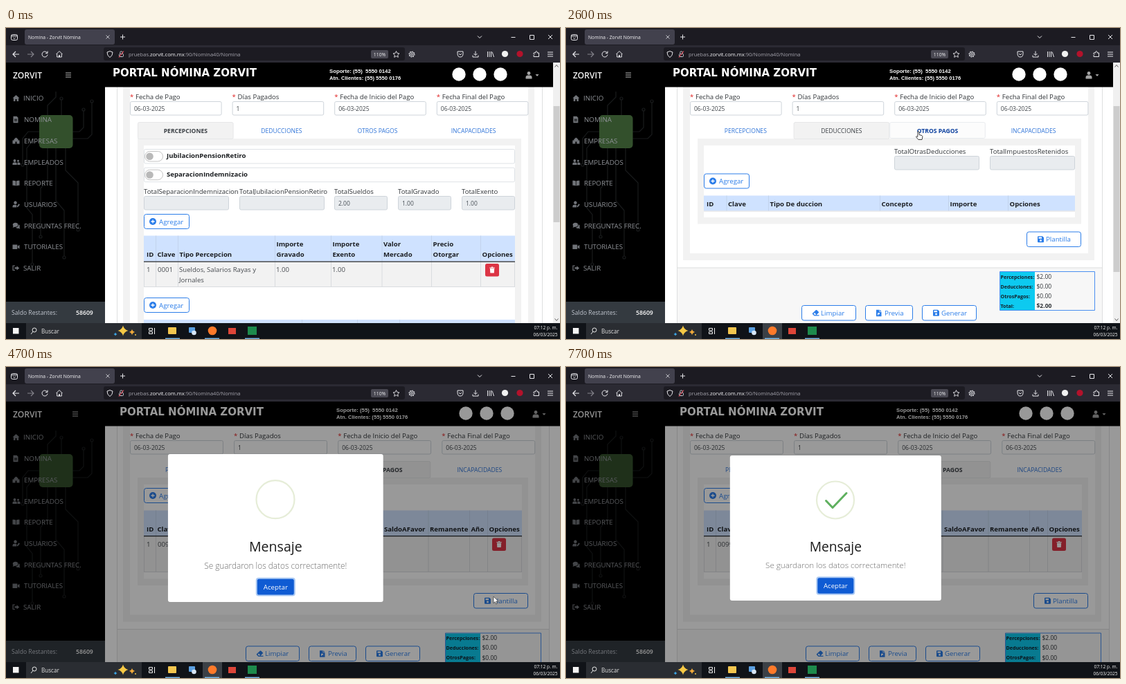
Write an HTML page with a canvas that moves like this. It is 800 px wide and 450 px high and loops after 7800 ms.

```html
<!DOCTYPE html>
<html lang="es">
<head>
<meta charset="utf-8">
<title>Nomina</title>
<style>
html, body { margin: 0; width: 100%; height: 100%; overflow: hidden; background: #fff; }
canvas { display: block; width: 800px; height: 450px; }
</style>
</head>
<body>
<canvas id="stage"></canvas>
<script>
const LOOP = 7800, STEP = 100;
const SANS = '"Open Sans", "Noto Sans", sans-serif';
const WIDE = '"DejaVu Sans", sans-serif';
const ARIAL = '"Liberation Sans", Arial, sans-serif';
const BLUE = '#2b7de9', INK = '#2f3337', BAND = '#f2f2f2', HEAD = '#cfe2ff', LINE = '#d9dcdf';
const BRAND = 'Zorvit';
const TOP = 50, FLOOR = 427;

const cv = document.getElementById('stage');
const g = cv.getContext('2d');
const dpr = window.devicePixelRatio || 1;
cv.width = 800 * dpr;
cv.height = 450 * dpr;

// ---- helpers ----
function rect(x, y, w, h, fill, stroke, r = 0) {
  g.beginPath();
  if (stroke) g.roundRect(x + .5, y + .5, w - 1, h - 1, r);
  else g.roundRect(x, y, w, h, r);
  if (fill) { g.fillStyle = fill; g.fill(); }
  if (stroke) { g.strokeStyle = stroke; g.lineWidth = 1; g.stroke(); }
}
function disc(x, y, r, fill, stroke, lw = 1) {
  g.beginPath();
  g.arc(x, y, r, 0, Math.PI * 2);
  if (fill) { g.fillStyle = fill; g.fill(); }
  if (stroke) { g.strokeStyle = stroke; g.lineWidth = lw; g.stroke(); }
}
function text(s, x, y, size = 9.6, color = INK, weight = 400, align = 'left', font = SANS) {
  g.font = `${weight} ${size}px ${font}`;
  g.textAlign = align;
  g.fillStyle = color;
  g.fillText(s, x, y);
  return g.measureText(s).width;
}
const bold = (s, x, y, size = 9.6, color = '#1b1e21') => text(s, x, y, size, color, 700);
function shape(d, x, y, fill, stroke, lw = 1) {
  const p = new Path2D(d);
  g.save();
  g.translate(x, y);
  if (fill) { g.fillStyle = fill; g.fill(p, 'evenodd'); }
  if (stroke) { g.strokeStyle = stroke; g.lineWidth = lw; g.stroke(p); }
  g.restore();
}
function faded(alpha, paint) {
  g.save();
  g.globalAlpha = alpha;
  paint();
  g.restore();
}
const clamp = v => Math.max(0, Math.min(1, v));
const ramp = (t, a, b) => clamp((t - a) / (b - a));
const ease = p => p * p * (3 - 2 * p);
const mix = (a, b, p) => a + (b - a) * p;
// keys: [position, value] pairs
function track(keys, t, f = p => p) {
  if (t <= keys[0][0]) return keys[0][1];
  for (let i = 1; i < keys.length; i++) {
    const [a, u] = keys[i - 1], [b, v] = keys[i];
    if (t <= b) return mix(u, v, f((t - a) / (b - a)));
  }
  return keys[keys.length - 1][1];
}

const ICON = {
  save: 'M0 1Q0 0 1 0H7L9 2V8Q9 9 8 9H1Q0 9 0 8ZM1.5 1.3V3.4H6V1.3ZM4.5 4.8A1.4 1.4 0 1 0 4.51 4.8Z',
  erase: 'M0 5L5 0.3Q5.7 0 6.3 .5L8.8 3Q9.3 3.6 8.8 4.2L5.5 7.6H9.5V8.8H2.5L0 6.3Q-.4 5.6 0 5ZM1.5 5.7L3.3 7.6H4L5 6.5L3 4.3Z',
  file: 'M0 0H4.5V3H7.5V9.5H0ZM5.2 0L7.5 2.3H5.2ZM2 4.5V7.8H3V6.6H5V4.5Z',
  trash: 'M0 1H2.2L2.8 .2H4.7L5.3 1H7.5V2H0ZM.6 2.7H6.9L6.5 9H1Z'
};
const MENU = [
  ['INICIO', 'M5 0L10 4.6H8.6V9H6V6H4V9H1.4V4.6H0Z'],
  ['NOMINA', 'M1 0H6L8 2V9.5H1ZM2.5 4V5H6.5V4ZM2.5 6V7H6.5V6Z'],
  ['EMPRESAS', 'M5 0L8 2.5V4H10V9H6V6H4V9H0V4H2V2.5Z'],
  ['EMPLEADOS', 'M3 1A1.9 1.9 0 1 0 3.01 1ZM8 1.6A1.5 1.5 0 1 0 8.01 1.6ZM0 9V7Q0 5.3 2 5.3H4.5Q6.2 5.3 6.2 7V9ZM7 9V5.4H9Q11 5.4 11 7V9Z'],
  ['REPORTE', 'M0 1Q3 .5 4.7 1.8V8.6Q3 7.5 0 8ZM5.4 1.8Q7 .5 10 1V8Q7 7.5 5.4 8.6Z'],
  ['USUARIOS', 'M4 0A2.3 2.3 0 1 0 4.01 0ZM0 9V7.5Q0 5.3 2.5 5.3H5L6 6.5L5.5 9ZM9 3.8L10.5 5.2L7.7 8.4L6.3 9L6.6 7Z'],
  ['PREGUNTAS FREC.', 'M4 .5A3.8 3 0 0 1 4 6.5L.2 7.6L1 5.4A3.5 3 0 0 1 4 .5ZM8.6 3Q11 4.2 10 7L10.8 9.2L8 8.6Q5.5 9 4.6 7.4Q8.5 7 8.6 3Z'],
  ['TUTORIALES', 'M0 1.5H6.8V8H0ZM7.4 3.6L10 2V7.5L7.4 6Z'],
  ['SALIR', 'M0 1H3.5V2H1.2V7.5H3.5V8.5H0ZM3 3.7H6V1.6L9.7 4.8L6 8V5.9H3Z']
];

// ---- browser window and taskbar ----
function drawBrowser() {
  rect(0, 0, 800, 26, '#1c1b22');
  rect(27, 2, 130, 22, '#42414d', null, 3);
  rect(0, 25, 800, 25, '#2b2a33');
  const w = '#e8e8ec';
  rect(7, 9, 10, 9, null, w, 2);
  shape('M0 0H8', 8, 11.5, null, w);
  shape('M0 0L2 2L4 0', 10, 13.5, null, w);
  text(`Nomina - ${BRAND} Nómina`, 32, 15.6, 6.75, '#f4f4f6');
  shape('M0 0L5 5M5 0L0 5', 144.5, 10.5, null, '#d0d0d5', .9);
  shape('M0 3.5H7M3.5 0V7', 165, 9.5, null, w);
  shape('M0 0L3 3L6 0', 681, 11.5, null, w);
  shape('M0 0H6', 729.5, 13.5, null, w);
  rect(756, 10, 7, 7, null, w);
  shape('M0 0L6 6M6 0L0 6', 783, 10, null, w);

  shape('M9 4H0M4 0L0 4L4 8', 10, 34, null, w, 1.2);
  shape('M0 4H9M5 0L9 4L5 8', 31, 34, null, '#85848c', 1.1);
  shape('M7.5 2.5A4 4 0 1 0 8 5M8 0V3H5', 52, 33.5, null, w);
  shape('M0 4.5L4.5 0L9 4.5M1.2 3.8V8.5H7.8V3.8M4 8.5V6H5V8.5', 72.5, 33.5, null, w);
  rect(141, 28, 435, 19, '#1c1b22', null, 3);
  shape('M4 0L8 1.5Q8 7 4 9Q0 7 0 1.5Z', 146, 33.5, null, w);
  rect(163, 37, 7, 5, null, '#c7c7cc', 1);
  shape('M0 3V1.5Q0 0 1.7 0Q3.4 0 3.4 1.5V3', 164.8, 33.8, null, '#c7c7cc');
  shape('M0 9L7 0', 163, 33.5, null, '#e04a59', 1.2);
  let x = 177;
  const dim = '#a5a4ad';
  x += text('pruebas.', x, 41, 7.55, dim);
  x += text(BRAND.toLowerCase() + '.com.mx', x, 41, 7.55, '#fbfbfe');
  text(':90/Nomina40/Nomina', x, 41, 7.55, dim);
  rect(527, 32, 25, 12, '#4a4953', null, 2);
  text('110%', 539.5, 40.6, 6.8, '#f4f4f6', 400, 'center');
  shape('M4.5 0L5.9 3L9 3.4L6.7 5.5L7.3 8.8L4.5 7.2L1.7 8.8L2.3 5.5L0 3.4L3.1 3Z', 559, 33.5, null, w, .9);
  disc(586, 38, 1.4, null, w, .9);
  disc(586, 38, 3.3, null, w, .9);
  g.setLineDash([1.3, 1.84]);
  disc(586, 38, 4, null, w, 1.2);
  g.setLineDash([]);
  shape('M0 0H8V3Q8 8 4 8Q0 8 0 3ZM2 3L4 5L6 3', 652, 34, null, w);
  shape('M4 0V6M1.5 3.5L4 6L6.5 3.5M0 6V8.5H8V6', 674, 33.5, null, w);
  shape('M0 0V8M2.5 0V8M5 0V8M6.5 .5L9 8', 695.5, 34, null, w);
  disc(720.5, 37.5, 4.6, '#f2f2f2');
  disc(742, 37.5, 4.6, '#b3122b');
  shape('M0 2.5H2.5V1Q4 -1 5 1V2.5H7.5V8H0V6Q2 5 0 4Z', 762, 33.5, null, w);
  shape('M0 0H8M0 3H8M0 6H8', 782, 35, null, w);
}

function star(x, y, r, fill) {
  shape(`M0 ${-r}Q${r * .2} ${-r * .2} ${r} 0Q${r * .2} ${r * .2} 0 ${r}Q${-r * .2} ${r * .2} ${-r} 0Q${-r * .2} ${-r * .2} 0 ${-r}Z`, x, y, fill);
}

function drawTaskbar(focused) {
  rect(0, FLOOR, 800, 450 - FLOOR, '#101318');
  rect(10, 434, 8.5, 8.5, '#f4f4f4');
  rect(29, FLOOR, 167, 23, '#2a2d32');
  disc(41, 437, 3, null, '#e6e6e6');
  shape('M0 4L3.2 0', 36, 439, null, '#e6e6e6');
  text('Buscar', 51, 441.6, 8.1, '#e4e4e4');
  star(169, 438, 7.5, '#f6c945');
  star(182, 440, 4.2, '#f0a93a');
  star(158, 443, 2.6, '#3fa9e8');
  disc(187, 444, 1, '#f6c945');
  rect(206, 434, 6, 4, null, '#eee');
  rect(206, 439, 6, 4, null, '#eee');
  shape('M0 0V9', 214.5, 434, null, '#eee');
  if (focused) rect(284, FLOOR, 28, 23, '#3b4046');
  rect(234, 433, 12, 10, '#f3c64f', null, 1);
  rect(264, 433, 9, 8, '#5b9fe0', null, 1);
  disc(271.5, 441, 3.3, '#d7e6f5');
  disc(298, 438, 6.3, '#ff7a2a');
  rect(321, 434, 11, 9, '#dd4538');
  rect(349, 432, 13, 12, '#1d8a4c');
  for (const x of [230, 287, 345]) rect(x, 448.6, 21, 1.4, '#76b9ed');
  text('07:12 p. m.', 796.5, 435.6, 6.6, '#f4f4f4', 400, 'right');
  text('06/03/2025', 796.5, 446, 6.6, '#f4f4f4', 400, 'right');
}

// ---- page chrome ----
function drawSidebar(s) {
  rect(0, TOP, 143, FLOOR - TOP, '#000');
  const wire = '#191b1c';
  const wires = ['M96 150H106L112 144V120', 'M96 160H118L124 154V108', 'M60 126V112L72 100V92', 'M80 126V104',
    'M60 174V220L50 232V300', 'M72 174V250L84 264V330', 'M86 174V206L104 224V290', 'M48 150H32L24 160V196', 'M48 164H38L30 174V260L38 270V340'];
  for (const d of wires) shape(d, 0, 0, null, wire, 1.2);
  for (const [x, y] of [[112, 118], [124, 106], [80, 102], [50, 302], [84, 332], [104, 292], [24, 198], [38, 342]]) disc(x, y, 2, null, wire, 1.2);
  rect(48, 126, 48.5, 48, '#33502c', null, 5);

  text(BRAND.toUpperCase(), 10, 73, 12.1, '#f2f2f2', 600);
  shape('M0 0H8M0 3H8M0 6H8', 86 + 10 * s, 65, null, '#b9b9b9', 1.1);
  MENU.forEach(([name, d], i) => {
    const y = 101.8 + i * 30.7;
    shape(d, 9.5, y - 4.8, '#707378');
    text(name, i % 8 ? 26 : 25, y + 3.6, 9.75, '#8f9297');
  });
  rect(0, 396, 143, FLOOR - 396, '#343a40');
  text('Saldo Restantes:', 8, 415, 8.6, '#c2c7d0');
  text('58609', 101, 415, 8.7, '#fff', 600);
}

function drawHeader(s) {
  rect(143, TOP, 647 + 10 * s, 35.5, '#000');
  g.save();
  g.translate(10 * s, 0);
  text('PORTAL NÓMINA ' + BRAND.toUpperCase(), 154, 70.3, 15, '#fff', 700, 'left', WIDE);
  text('Soporte: (55)  5550 0142', 467, 64.8, 7.75, '#fff', 700, 'left', ARIAL);
  text('Atn. Clientes: (55) 5550 0176', 467, 75.2, 7.65, '#fff', 700, 'left', ARIAL);
  for (const x of [654, 684, 714]) disc(x, 67, 9.7, '#fff');
  disc(755, 65.5, 2.4, '#a4a4a4');
  shape('M0 5V3Q0 0 3 0H6Q9 0 9 3V5Z', 750.5, 68.6, '#a4a4a4');
  shape('M0 0H5L2.5 3Z', 764.5, 67, '#a4a4a4');
  g.restore();
}

function drawScrollbar(end) {
  rect(790, TOP, 10, FLOOR - TOP, '#f0f0f0');
  rect(790.5, 113, 9, end - 113, '#cdcdcd');
  shape('M0 3L2.5 0L5 3', 792.5, 53.5, null, '#606060');
  shape('M0 0L2.5 3L5 0', 792.5, 420.5, null, '#606060');
}

// ---- page parts ----
function button(label, x, y, w, h, icon, hot) {
  rect(x, y, w, h, hot ? '#0d6efd' : '#fff', BLUE, 3);
  const c = hot ? '#fff' : BLUE;
  if (icon === 'plus') {
    disc(x + 13, y + h / 2, 5, c);
    shape('M0 2.6H5.2M2.6 0V5.2', x + 10.4, y + h / 2 - 2.6, null, '#fff', 1.3);
    text(label, x + 22, y + h / 2 + 3.5, 9.7, c);
  } else {
    shape(ICON[icon], x + 16, y + h / 2 - 4.5, c);
    text(label, x + 28, y + h / 2 + 3.6, 9.7, c);
  }
}
const addButton = y => button('Agregar', 199, y, 66, 22, 'plus');
function readOnly(label, value, x, y, w) {
  text(label, x, y - 3);
  rect(x, y, w, 20.5, '#e9ecef', '#ced4da', 2);
  text(value, x + 6, y + 14, 8.5, '#495057');
}
function trash(x, y) {
  rect(x, y, 20, 18.5, '#dc3545', null, 2.5);
  shape(ICON.trash, x + 6.3, y + 4.4, '#fff');
}
// cols: [left edge, heading, break the heading into lines]
function tableHead(cols, y, h, right) {
  rect(199, y, right - 199, h, HEAD);
  cols.forEach(([x, name, twoLines]) => {
    if (x > 199) rect(x, y, 1, h, '#c2d3ec');
    const lines = twoLines ? name.split(' ') : [name];
    const tx = x + (x > 199 ? 2.5 : 4);
    lines.forEach((s, i) => bold(s, tx, y + h - 6.5 - 15 * (lines.length - 1 - i)));
  });
}
function tableRow(cols, y, h, right) {
  rect(199, y, right - 199, h, BAND);
  for (const [x] of cols) rect(x, y, 1, h, LINE);
  rect(right - 1, y, 1, h, LINE);
  rect(199, y + h, right - 199, 1, LINE);
  rect(199, y - 1, right - 199, 1.2, '#212529');
}
const cell = (s, x, y) => text(s, x, y, 9.6, '#474b50');

function drawPerceptions() {
  ['JubilacionPensionRetiro', 'SeparacionIndemnizacio'].forEach((name, i) => {
    const y = 175 + i * 26.7;
    rect(199, y, 536, 21.5, '#fff', '#dee2e6', 2);
    rect(200, y + 3, 27, 15.5, '#fff', '#c3c3c3', 8);
    disc(207.5, y + 10.8, 5.3, '#b9b9b9');
    bold(name, 232, y + 12.9);
  });
  readOnly('TotalSeparacionIndemnizacion', '', 199, 243, 123);
  readOnly('TotalJubilacionPensionRetiro', '', 337, 243, 123);
  readOnly('TotalSueldos', '2.00', 474, 243, 77);
  readOnly('TotalGravado', '1.00', 566, 243, 77);
  readOnly('TotalExento', '1.00', 658, 243, 77);
  addButton(269);
  const cols = [[199, 'ID'], [216, 'Clave'], [248, 'Tipo Percepcion'], [388, 'Importe Gravado', 1], [469, 'Importe Exento', 1],
    [542.5, 'Valor Mercado', 1], [614, 'Precio Otorgar', 1], [685, 'Opciones']];
  tableHead(cols, 300.5, 37, 735);
  tableRow(cols, 338.5, 35.5, 735);
  cell('1', 203, 353);
  cell('0001', 219, 353);
  cell('Sueldos, Salarios Rayas y', 250, 353);
  cell('Jornales', 250, 368);
  cell('1.00', 390, 353);
  cell('1.00', 471, 353);
  trash(692, 341);
  addButton(390);
  tableHead([[199, ''], [427, ''], [507, ''], [568, '']], 422, 20, 735);
}
function drawDeductions() {
  readOnly('TotalOtrasDeducciones', '', 474, 185, 123);
  readOnly('TotalImpuestosRetenidos', '', 612, 185, 123);
  addButton(210.5);
  tableHead([[199, 'ID'], [231.5, 'Clave'], [292, 'Tipo De duccion'], [453, 'Concepto'], [552, 'Importe'], [638, 'Opciones']], 242.5, 22, 735);
  rect(199, 264.5, 536, 1, LINE);
}
function drawOther(s) {
  const k = 10 * s, right = 735 + k;
  addButton(175);
  const cols = [[199, 'ID'], [216, 'Clave'], [248, 'Tipo'], [379, 'Concepto'], [431, 'Importe'], [475, 'Subsidio Causado', 1],
    [533.5 + k, 'SaldoAFavor'], [599.5 + k, 'Remanente'], [659 + k, 'Año'], [685 + k, 'Opciones']];
  tableHead(cols, 207.5, 36.5, right);
  tableRow(cols, 245, 51, right);
  cell('1', 203, 259.5);
  cell('0099', 219, 259.5);
  ['Subsidio para el empleo', '(efectivamente entregado', 'al trabajador)'].forEach((l, i) => cell(l, 250, 259.5 + 15.2 * i));
  cell('subsidio', 381, 259.5);
  cell('0.00', 433, 259.5);
  cell('0.00', 477, 259.5);
  trash(692 + k, 247.5);
}
const PANES = [drawPerceptions, drawDeductions, drawOther];
const BOTTOM = [600, 274, 306.5];
const THUMB = [281, 353, 338];

function drawTabs(st, s) {
  const w = 138.6 + 2.5 * s;
  ['PERCEPCIONES', 'DEDUCCIONES', 'OTROS PAGOS', 'INCAPACIDADES'].forEach((name, i) => {
    const x = 190 + i * w, on = i === st.tab;
    if (on) rect(x, 136, w, 25, BAND, '#e6e7e8', 2);
    else if (i === st.hover) rect(x, 136, w, 24, '#fcfcfc', '#e9ecef', 2);
    let c = on ? '#3a3f44' : '#2f74d8';
    if (i === st.hover) c = on ? '#16305c' : '#0a3f9e';
    text(name, x + w / 2, 152, 8.6, c, i === st.focus ? 700 : 400, 'center');
  });
}

function drawPage(st) {
  const s = st.wide, k = 10 * s, h = BOTTOM[st.pane];
  rect(143, TOP, 657, FLOOR - TOP, '#fff');
  rect(160, 85, 1, FLOOR - 85, '#dedfe0');
  rect(774 + k, 85, 1, FLOOR - 85, '#dedfe0');
  rect(169, 85, 594 + k, h + 62 - 85, BAND);
  rect(179, 85, 575 + k, h + 52 - 85, '#fff');
  ['Fecha de Pago', 'Días Pagados', 'Fecha de Inicio del Pago', 'Fecha Final del Pago'].forEach((name, i) => {
    const x = 179 + i * (147.6 + 2.5 * s);
    text('*', x, 102.5, 9.6, '#e02020');
    text(name, x + 8, 102.5);
    rect(x, 106, 132.6 + 2.3 * s, 20.5, '#fff', '#ced4da', 2);
    text(i === 1 ? '1' : '06-03-2025', x + 6, 119.6, 8.5, '#3d4247');
  });
  // the panel fades together with its contents
  faded(st.alpha, () => {
    rect(190, 160, 554 + k, h + 9.5 - 160, BAND);
    rect(199, 170, 536 + k, h - 170, '#fff');
    PANES[st.pane](s);
  });
  drawTabs(st, s);

  button('Plantilla', 665 + k, h + 20.5, 79, 22.5, 'save', st.hot);
  const f = h + 72.5;
  rect(161, f, 613 + k, 100, '#f7f7f7');
  rect(160, f, 615 + k, 1, '#dedfe0');
  const x = 626 + 8 * s, y = f + 5.5;
  rect(x, y, 138 + s, 57, '#f7f7f7', '#4a8ff0');
  rect(x + 1, y + 1, 50, 55, '#0dcaf0');
  ['Percepciones:', 'Deducciones:', 'OtrosPagos:', 'Total:'].forEach((name, i) => {
    const by = y + 10.5 + i * 14.1;
    bold(name, x + 1.5, by, 7.1, '#14202b');
    text(i % 3 ? '$0.00' : '$2.00', x + 53.5, by + .3, 8.5, INK, i === 3 ? 700 : 400);
  });
  const b = f + 54.5 - 30 * s;
  button('Limpiar', 340 + 6 * s, b, 79 - s, 22.5, 'erase');
  button('Previa', 432 + 5 * s, b, 69, 22.5, 'file');
  button('Generar', 514 + 5 * s, b, 79, 22.5, 'save');
}

// ---- message box ----
function drawDialog(age) {
  const scale = track([[0, .7], [135, 1.05], [240, .95], [300, 1]], age, ease);
  g.save();
  g.translate(389.3, 233);
  g.scale(scale, scale);
  g.translate(-389.3, -233);
  rect(236.8, 128, 305, 210, '#fff', null, 3);
  disc(389, 192.5, 27, null, '#e6edd8', 2.2);
  const tip = ramp(age, 405, 560), arm = ramp(age, 500, 650);
  g.lineCap = g.lineJoin = 'round';
  if (tip > 0) {
    const d = `M375.5 193.5L${mix(375.5, 385, tip)} ${mix(193.5, 203.5, tip)}` + (arm > 0 ? `L${mix(385, 405, arm)} ${mix(203.5, 182.5, arm)}` : '');
    shape(d, 0, 0, null, '#5fb05f', 3);
  }
  g.lineCap = 'butt';
  g.lineJoin = 'miter';
  text('Mensaje', 389.3, 266.5, 19.2, '#1c1c1c', 400, 'center');
  text('Se guardaron los datos correctamente!', 389.3, 290.5, 11.6, '#6c6c6c', 300, 'center');
  rect(361.3, 303.3, 56, 26.4, '#a9c8f3', null, 4);
  rect(363.3, 305.3, 52, 22.4, '#0f5bd3', null, 2.5);
  text('Aceptar', 389.3, 320, 9.6, '#fff', 400, 'center');
  g.restore();
}

// ---- pointer: [time, x, y] ----
const PATH = [
  [500, 430, 462], [1400, 380, 151], [2000, 380, 151], [2500, 509, 150], [3000, 509, 150],
  [3600, 677, 251], [4000, 704, 333], [4800, 704, 332], [5400, 699, 334], [5700, 699, 334], [6100, 645, 464]
];
function drawPointer(t, hand) {
  if (t < 500 || t > 6100) return;
  const at = n => track(PATH.map(p => [p[0], p[n]]), t, ease);
  const x = at(1), y = at(2);
  if (hand) shape('M0 0Q1.4 -.8 2 .4V4.5L6 5.6Q7 6 6.8 8L6 11.5H.8L-2.6 7.4Q-2 6 -.2 7.4Z', x - 1, y, '#fff', '#111', .8);
  else shape('M0 0V9.6L2.2 7.6L3.7 11L5.2 10.3L3.8 7H6.8Z', x, y, '#fff', '#333', .7);
}

// ---- timeline ----
const CLICK_1 = 1675, CLICK_2 = 2640, FADE = 150, OPEN = 4526;

function stateAt(t) {
  const fadeOf = c => t < c + FADE ? 1 - ramp(t, c, c + FADE) : ramp(t, c + FADE, c + 2 * FADE);
  return {
    tab: t < CLICK_1 ? 0 : t < CLICK_2 ? 1 : 2,
    pane: t < CLICK_1 + FADE ? 0 : t < CLICK_2 + FADE ? 1 : 2,
    alpha: t < 2300 ? fadeOf(CLICK_1) : fadeOf(CLICK_2),
    focus: t < 1600 ? 0 : t < 2600 ? 1 : 2,
    hover: t >= 1300 && t < 2200 ? 1 : t >= 2300 && t < 3200 ? 2 : -1,
    hot: t >= 4000 && t < OPEN,
    wide: t >= OPEN ? 1 : 0
  };
}

function draw(t) {
  g.setTransform(dpr, 0, 0, dpr, 0, 0);
  const st = stateAt(t);
  drawPage(st);
  drawHeader(st.wide);
  drawSidebar(st.wide);
  if (!st.wide) drawScrollbar(THUMB[st.pane]);
  if (t >= OPEN) {
    rect(0, TOP, 800, FLOOR - TOP, `rgba(0,0,0,${.4 * ramp(t, OPEN, OPEN + 100)})`);
    drawDialog(t - OPEN);
  }
  drawBrowser();
  drawTaskbar(t >= 400);
  drawPointer(t, st.hover >= 0 || st.hot);
}

const start = performance.now();
function tick() {
  const t = (performance.now() - start) % LOOP;
  draw(Math.floor(t / STEP) * STEP);
  requestAnimationFrame(tick);
}
tick();
</script>
</body>
</html>
```
